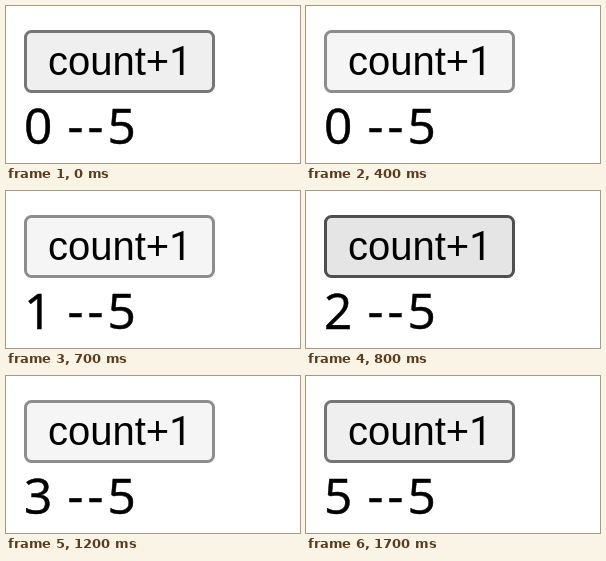
Animation, 294 px wide and 157 px high, one loop 2100 ms. Source, as an HTML page:

```html
<!DOCTYPE html>
<html lang="en">
<head>
<meta charset="utf-8">
<title>Counter</title>
<style>
  html, body { margin: 0; width: 100%; height: 100%; overflow: hidden; background: #fff; }
  svg { display: block; }
  .stage { width: 294px; height: 157px; }
  .label { font: 40px "Liberation Sans", Arial, sans-serif; }
  .plain-one { font-family: Roboto, sans-serif; }
  .value { font: 49.5px "Open Sans", "Noto Sans", sans-serif; stroke: #000; stroke-width: .5px; }
  .dashes { letter-spacing: 4px; }

  .button {
    fill: #efefef; stroke: #767676; stroke-width: 3;
    animation: press 2100ms step-end infinite;
  }
  .digits { animation: count 2100ms step-end infinite; }

  /* idle, hover (darker) and pressed (lighter) */
  @keyframes press {
    0%, 80.952% { fill: #efefef; stroke: #767676; }
    4.761%, 23.809%, 38.095%, 52.38%, 61.904% { fill: #e5e5e5; stroke: #4f4f4f; }
    19.047%, 33.333%, 47.619%, 57.142% { fill: #f5f5f5; stroke: #8d8d8d; }
  }
  @keyframes count {
    0% { transform: translateY(0); }
    23.809% { transform: translateY(-60px); }
    38.095% { transform: translateY(-120px); }
    52.38% { transform: translateY(-180px); }
    61.904% { transform: translateY(-240px); }
    71.428%, 100% { transform: translateY(-300px); }
  }
</style>
</head>
<body>
<svg class="stage" viewBox="0 0 294 157">
  <rect class="button" x="19.5" y="25.5" width="188" height="60" rx="6"/>
  <text class="label" x="42" y="69">count+<tspan class="plain-one">1</tspan></text>
  <svg class="value" x="18" y="95" width="32" height="50" overflow="hidden">
    <g class="digits">
      <text y="43">0</text>
      <text y="103">1</text>
      <text y="163">2</text>
      <text y="223">3</text>
      <text y="283">4</text>
      <text y="343">5</text>
    </g>
  </svg>
  <text class="value dashes" x="61.5" y="137">--</text>
  <text class="value" x="101.5" y="138">5</text>
</svg>
</body>
</html>
```
